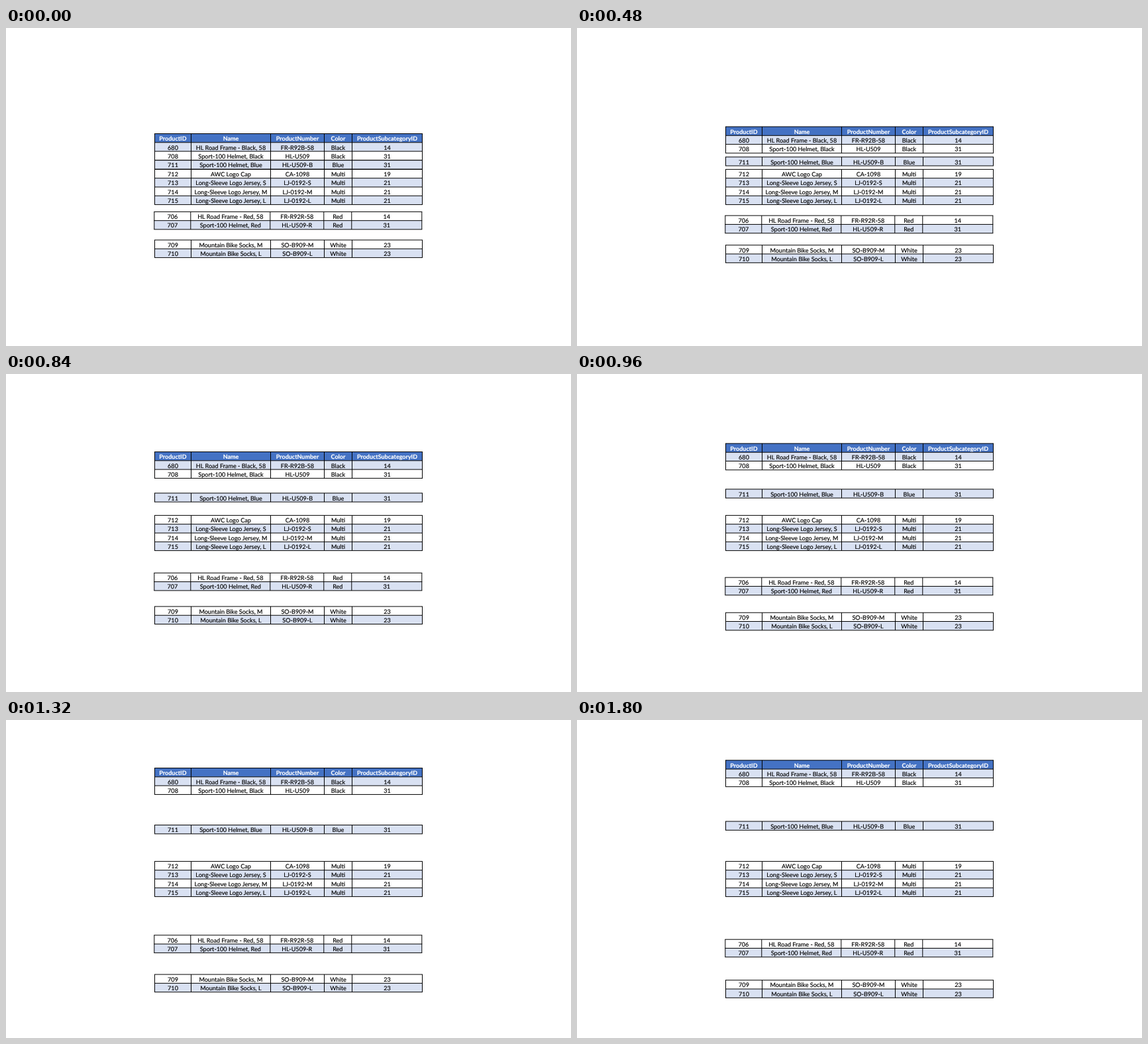
An HTML page that plays this animation: 853x480 px, repeating every 1860 ms.

```html
<!DOCTYPE html>
<html lang="en">
<head>
<meta charset="utf-8">
<title>Splitting table</title>
<style>
  html, body { margin: 0; width: 100%; height: 100%; overflow: hidden; background: #fff; }
  svg { display: block; }
  text {
    font: 9.1px Lato, Carlito, sans-serif;
    text-anchor: middle;
    text-rendering: geometricPrecision;
    stroke: #000;
    stroke-width: .16;
  }
  .head { font-weight: 700; font-size: 9px; fill: #fff; stroke: #fff; }
  path { fill: none; stroke: #000; }
</style>
</head>
<body>
<svg id="stage" width="853" height="480" viewBox="0 0 853 480"></svg>
<script>
const LOOP = 1860, STEP = 60, ROW = 13.3;
const edges = [224.5, 279.5, 399.5, 480.5, 522.5, 628.5];

// Each block: left shift, top at rest, vertical travel, rows.
const blocks = [
  { x: 0, y: 213.4, travel: 0, rows: [
    '712|AWC Logo Cap|CA-1098|Multi|19',
    '+713|Long-Sleeve Logo Jersey, S|LJ-0192-S|Multi|21',
    '714|Long-Sleeve Logo Jersey, M|LJ-0192-M|Multi|21',
    '+715|Long-Sleeve Logo Jersey, L|LJ-0192-L|Multi|21'] },
  { x: 0, y: 199.7, travel: -46.7, rows: [
    '+711|Sport-100 Helmet, Blue|HL-U509-B|Blue|31'] },
  { x: 0, y: 159.5, travel: -98.7, rows: [
    '#ProductID|Name|ProductNumber|Color|ProductSubcategoryID',
    '+680|HL Road Frame - Black, 58|FR-R92B-58|Black|14',
    '708|Sport-100 Helmet, Black|HL-U509|Black|31'] },
  { x: -0.7, y: 277.4, travel: 53.8, rows: [
    '706|HL Road Frame - Red, 58|FR-R92R-58|Red|14',
    '+707|Sport-100 Helmet, Red|HL-U509-R|Red|31'] },
  { x: 0, y: 320, travel: 72.7, rows: [
    '709|Mountain Bike Socks, M|SO-B909-M|White|23',
    '+710|Mountain Bike Socks, L|SO-B909-L|White|23'] }
];

const fills = { '#': '#4472c4', '+': '#d9e1f2' };

function add(parent, tag, attrs, content = '') {
  const el = document.createElementNS('http://www.w3.org/2000/svg', tag);
  for (const key in attrs) el.setAttribute(key, attrs[key]);
  el.textContent = content;
  return parent.appendChild(el);
}

function build(block) {
  const left = edges[0], right = edges[5];
  const height = block.rows.length * ROW;
  const g = add(stage, 'g', {});
  let lines = `M${left - .5} ${height}H${right + .5}`;
  block.rows.forEach((row, i) => {
    const y = i * ROW, kind = fills[row[0]] ? row[0] : '';
    add(g, 'rect', { x: left, y, width: right - left, height: ROW, fill: fills[kind] || '#fff' });
    row.slice(kind.length).split('|').forEach((label, c) =>
      add(g, 'text', { x: (edges[c] + edges[c + 1]) / 2, y: y + 10.8, class: kind === '#' ? 'head' : '' }, label));
    lines += `M${left - .5} ${y}H${right + .5}`;
  });
  for (const x of edges) lines += `M${x} 0V${height}`;
  add(g, 'path', { d: lines });
  block.node = g;
}

// Constant acceleration, steady speed, constant braking.
function ease(s) {
  const ramp = 0.4, scale = 2 * ramp * (1 - ramp);
  s = Math.min(1, Math.max(0, s));
  if (s < ramp) return s * s / scale;
  if (s > 1 - ramp) return 1 - (1 - s) ** 2 / scale;
  return (s - ramp / 2) / (1 - ramp);
}

const start = performance.now();

function draw() {
  const elapsed = Math.max(0, performance.now() - start) % LOOP;
  const time = Math.floor(elapsed / STEP) * STEP;
  const p = ease((time - 125) / 1570);
  for (const b of blocks)
    b.node.setAttribute('transform', `translate(${b.x} ${b.y + b.travel * p})`);
  requestAnimationFrame(draw);
}

const stage = document.getElementById('stage');
blocks.forEach(build);
draw();
</script>
</body>
</html>
```
